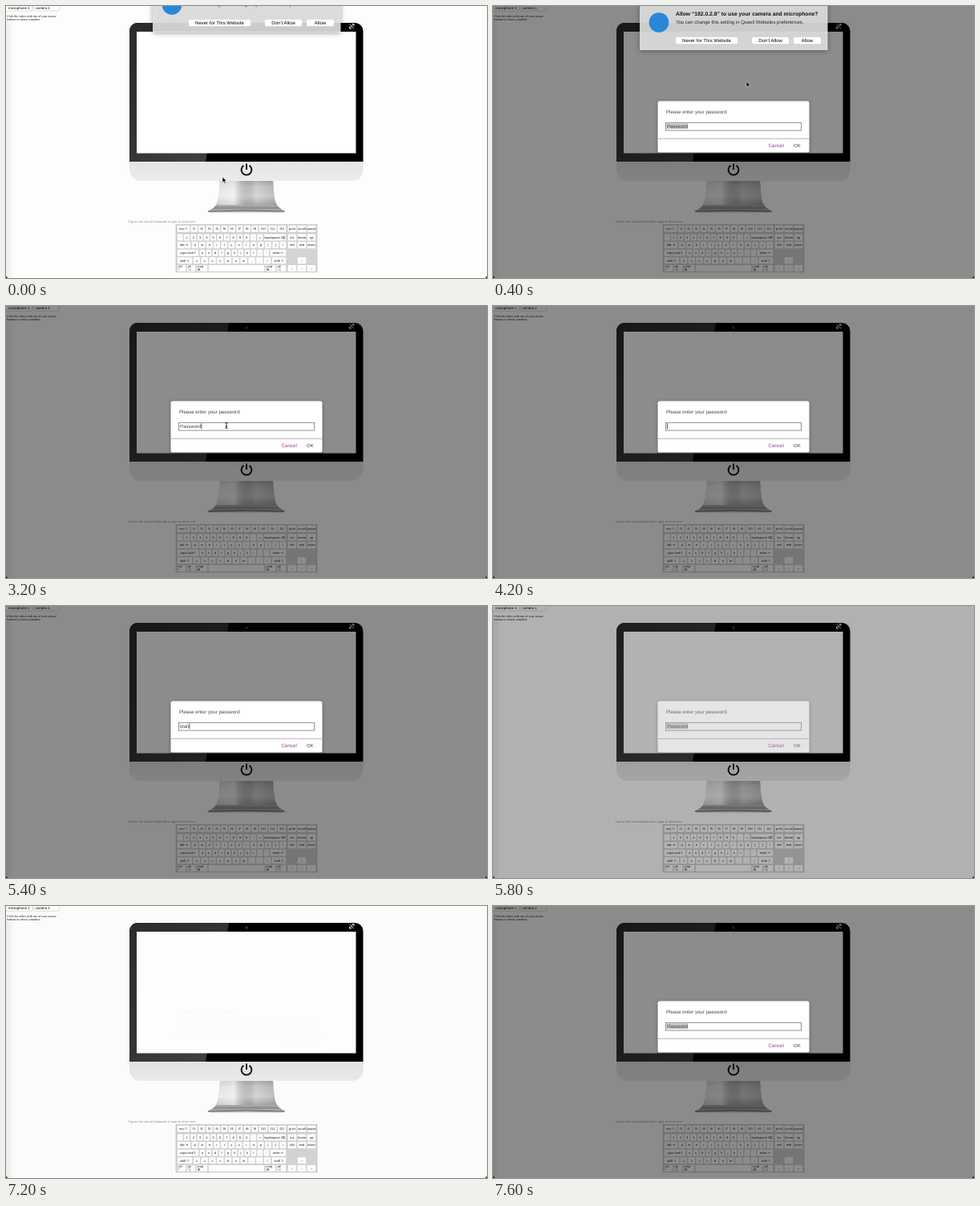
An HTML page for the animation above (8000 ms loop, 600x339 px).

```html
<!DOCTYPE html>
<html lang="en">
<head>
<meta charset="utf-8">
<title>Password prompt</title>
<style>
  html, body { margin: 0; height: 100%; overflow: hidden; background: #fdfdfd; }
  svg { display: block; width: 100vw; height: 100vh; }
  text { font: 6px "Liberation Sans", Arial, "DejaVu Sans", sans-serif; text-rendering: geometricPrecision; white-space: pre; }
  .mid { text-anchor: middle; }
  .key { font-size: 4px; fill: #222; }
  .serif { font: 3.9px "Liberation Serif", serif; }
  #sheet { filter: drop-shadow(0 1px 3px rgba(0, 0, 0, .4)); }
  #sheet .button { fill: #fff; filter: drop-shadow(0 .4px .4px rgba(0, 0, 0, .3)); }
  #dialog .card { filter: drop-shadow(0 1px 2px rgba(0, 0, 0, .35)); }
</style>
</head>
<body>
<svg viewBox="0 0 600 339">
  <defs>
    <linearGradient id="edge"><stop stop-color="#000" stop-opacity=".07"/><stop offset="1" stop-opacity="0"/></linearGradient>
    <linearGradient id="gloss" x2=".8" y2="1"><stop stop-color="#2b2b2b"/><stop offset=".5" stop-color="#333"/><stop offset="1" stop-color="#404040"/></linearGradient>
    <linearGradient id="chin" x2="0" y2="1"><stop stop-color="#e4e4e4"/><stop offset="1" stop-color="#ececec"/></linearGradient>
    <linearGradient id="neck" x2="0" y2="1">
      <stop stop-color="#b4b4b4"/><stop offset=".2" stop-color="#d4d4d4"/><stop offset=".5" stop-color="#e2e2e2"/>
      <stop offset=".75" stop-color="#b8b8b8"/><stop offset=".86" stop-color="#8c8c8c"/><stop offset="1" stop-color="#d8d8d8"/>
    </linearGradient>
    <linearGradient id="sheen">
      <stop stop-color="#fff" stop-opacity=".3"/><stop offset=".3" stop-color="#fff" stop-opacity=".55"/>
      <stop offset=".65" stop-color="#000" stop-opacity=".04"/><stop offset="1" stop-color="#000" stop-opacity=".16"/>
    </linearGradient>
    <clipPath id="case"><path d="M164 21H435.5a10 10 0 0 1 10 10V204a14 14 0 0 1-14 14H168a14 14 0 0 1-14-14V31a10 10 0 0 1 10-10Z"/></clipPath>
  </defs>

  <rect width="600" height="339" fill="#fdfdfd"/>
  <rect y="19" width="10" height="320" fill="url(#edge)"/>
  <g fill="#fff" stroke="#bbb" stroke-width=".5">
    <rect x="-3" y="-2" width="36" height="8.3" rx="2"/>
    <rect x="34" y="-2" width="32.5" height="8.3" rx="2"/>
  </g>
  <text x="3" y="4.2" style="font-size:4.4px">microphone 1</text>
  <text x="36.5" y="4.2" style="font-size:4.4px">camera 1</text>
  <text class="serif" x="1" y="13.6">Click the video with one of your mouse</text>
  <text class="serif" x="1" y="17.9">buttons to return a number.</text>

  <path id="stand" d="M267 217H333C334 233 335 244 338 248Q341 253 348 255.500Q347 257.500 340 257.500H260Q253 257.500 251.500 255.500Q259 253 262 248C265 243 266 233 267 217Z" fill="url(#neck)"/>
  <use href="#stand" style="fill:none"/>
  <path d="M267 217H333C334 233 335 244 338 248H262C265 243 266 233 267 217Z" fill="url(#sheen)"/>
  <path d="M252 256Q300 254 347.500 256" fill="none" stroke="#555" stroke-width="1"/>
  <g clip-path="url(#case)">
    <rect x="154" y="21" width="292" height="173" fill="#000"/>
    <path d="M154 21H278L249 194H154Z" fill="url(#gloss)"/>
    <rect x="154" y="194" width="292" height="24" fill="url(#chin)"/>
  </g>
  <rect x="163" y="32" width="273.500" height="151.500" fill="#fff"/>
  <circle cx="300" cy="27" r="1.300" fill="#222" stroke="#555" stroke-width=".6"/>
  <path d="M428.500 28L434 22.500M431.500 22.500H434V25M428.500 25.500V28H431M428.500 22.800L434 28" fill="none" stroke="#eee" stroke-width=".9"/>
  <path d="M296.500 198.800A6.400 6.400 0 1 0 303.500 198.800M300 196.500V204" fill="none" stroke="#111" stroke-width="2"/>

  <text x="152.500" y="269.700" fill="#888" style="font-size:3.8px;letter-spacing:.08px">Tap on the virtual keyboard or type to enter text</text>
  <rect x="212" y="272.300" width="176" height="59.500" fill="#d4d4d4" stroke="#bbb" stroke-width=".6"/>
  <g id="keys"></g>
  <path d="M0 336.500V339H2.500ZM600 336.500V339H597.500Z" fill="#333"/>

  <rect id="shade" width="600" height="339"/>
  <g id="dialog">
    <rect class="card" x="205.500" y="118.500" width="189" height="64" rx="2.500" fill="#fff"/>
    <text x="216" y="133.900" fill="#444" style="font-size:6.1px">Please enter your password</text>
    <rect x="215.400" y="145.300" width="169.200" height="9.800" fill="#fff" stroke="#777" stroke-width=".8"/>
    <rect id="selection" x="216.500" y="146.300" width="26.700" height="7" fill="#c4c4c4"/>
    <text id="entry" x="217" y="151.700" fill="#444"></text>
    <rect id="caret" y="146.300" width=".7" height="7" fill="#111"/>
    <path d="M205.500 165.500H394.500" stroke="#aaa" stroke-width=".8"/>
    <text x="343.500" y="176.400" fill="#963a94" style="font-size:6.25px">Cancel</text>
    <text x="375" y="176.400" fill="#66206c">OK</text>
  </g>

  <g id="sheet">
    <rect x="183" y="-30" width="234.500" height="85" fill="#e2e2e2" fill-opacity=".9"/>
    <circle cx="207" cy="20.500" r="12.300" fill="#2a86d8"/>
    <text x="228" y="12.400" fill="#111" style="font-size:6.78px;font-weight:bold">Allow “192.0.2.8” to use your camera and microphone?</text>
    <text x="228" y="22" fill="#222">You can change this setting in Quavil Websites preferences.</text>
    <g id="buttons"></g>
  </g>

  <path id="arrow" d="M0 0V7L1.600 5.500L2.800 8.200L3.900 7.700L2.800 5.100H5Z" stroke="#fff" stroke-width=".5"/>
  <path id="beam" d="M-1.600-3.500Q0-3.500 0-2.500Q0-3.500 1.600-3.500M0-2.500V2.500M-1.600 3.500Q0 3.500 0 2.500Q0 3.500 1.600 3.500M-.9.800H.9" fill="none" stroke="#111" stroke-width=".9"/>
</svg>

<script>
const $ = id => document.getElementById(id);
const LOOP = 8000, STEP = 200;

function label(x, y, text, cls = 'mid') {
  return `<text class="${cls}" x="${x}" y="${y}">${text}</text>`;
}

function box(x, y, w, h, attrs) {
  return `<rect x="${x}" y="${y}" width="${w}" height="${h}" ${attrs}/>`;
}

// Equal keys between two edges; "a|b" stacks two labels at the left.
function keyRun(y, left, right, names) {
  const list = names.split(' ');
  const w = (right - left) / list.length;
  return list.map((name, i) => {
    const x = left + i * w;
    const [top, bottom] = name === '|' ? ['|'] : name.replace('_', ' ').split('|');
    const face = box(x + .3, y, w - .6, 8.8, 'rx=".8" fill="#fefefe" stroke="#b8b8b8" stroke-width=".4"');
    if (bottom) return face + label(x + 1.5, y + 3.6, top, 'key') + label(x + 1.5, y + 7.9, bottom, 'key');
    return face + label(x + w / 2, y + 5.8, top, 'key mid');
  }).join('');
}

const rows = [
  [273.2, [213, 230, 'esc_⎋'], [230, 315, 'f1 f2 f3 f4 f5 f6 f7 f8 f9'], [315, 350, 'f10 f11 f12'], [351, 387, 'print scroll pause']],
  [284, [213, 321, '` 1 2 3 4 5 6 7 8 9 0 - ='], [321, 350, 'backspace_⌫'], [351, 387, 'ins home up']],
  [293.6, [213, 231, 'tab_⇥'], [231, 350, 'q w e r t y u i o p [ ] \\'], [351, 387, 'del end down']],
  [303.2, [213, 241, 'caps_lock⇪'], [241, 329, 'a s d f g h j k l ; \''], [329, 350, 'enter_↵']],
  [312.8, [213, 233, 'shift_⇧'], [233, 331, 'z x c v b n m , . /'], [331, 350, 'shift_⇧'], [363, 375, '↑']],
  [322.4, [213, 237, 'ctrl|^ alt|⌥'], [237, 252, 'cmd|⌘'], [252, 323, '_'], [323, 337, 'cmd|⌘'], [337, 350, 'alt|⌥'], [351, 387, '← ↓ →']]
];
$('keys').innerHTML = rows.map(([y, ...runs]) => runs.map(run => keyRun(y, ...run)).join('')).join('');

$('buttons').innerHTML = [[228, 77, 'Never for This Website'], [323, 46, 'Don’t Allow'], [375, 34, 'Allow']]
  .map(([x, w, text]) => box(x, 38.5, w, 9, 'rx="1.8" class="button"') + label(x + w / 2, 45.1, text)).join('');

// Entries are [start time, value...]; each holds until the next.
const SELECTED = '*';
const entries = [
  [0, SELECTED], [3200, 'Password'], [4000, SELECTED], [4200, ''],
  [5000, 'b'], [5200, 'bla'], [5400, 'blah'], [5800, SELECTED],
  [6600, 'b'], [6800, 'bla'], [7000, 'blah'], [7400, SELECTED]
];
const fades = [[0, 0], [200, .67], [400, 1], [5600, .02], [5800, .67], [6000, 1], [7200, .02], [7400, .67], [7600, 1]];
const slides = [[0, -22], [200, -2], [400, 0], [2400, -30], [2600, -70]];
const pointer = [
  [0, 'arrow', 270, 213], [200, 'arrow', 292, 152], [400, 'arrow', 316, 94], [600, 'arrow', 313, 105],
  [800, 'arrow', 308, 118], [1000, 'arrow', 302, 128], [1200, 'arrow', 299, 132], [1400, 'arrow', 325, 149],
  [1800, 'arrow', 350, 102], [2000, 'arrow', 386, 52], [2200, 'arrow', 390, 43], [2600, 'arrow', 345, 95],
  [2800, 'arrow', 290, 141], [3000, 'beam', 281, 148], [3200, 'beam', 275, 149], [4000, 'beam', 278, 149], [4200, 'none', 0, 0]
];

function at(track, t) {
  return track.filter(([start]) => start <= t).pop().slice(1);
}

function draw(t) {
  const [entry] = at(entries, t);
  const [fade] = at(fades, t);
  const [slide] = at(slides, t);
  const [shape, x, y] = at(pointer, t);
  const selected = entry === SELECTED;

  $('shade').setAttribute('opacity', .45 * fade);
  $('dialog').setAttribute('opacity', fade);
  $('sheet').setAttribute('transform', `translate(0 ${slide})`);
  $('entry').textContent = selected ? 'Password' : entry;
  $('selection').setAttribute('opacity', selected ? 1 : 0);
  $('caret').setAttribute('opacity', selected ? 0 : 1);
  $('caret').setAttribute('x', 217.2 + (entry ? $('entry').getComputedTextLength() : 0));
  for (const id of ['arrow', 'beam']) {
    $(id).setAttribute('visibility', id === shape ? 'visible' : 'hidden');
    $(id).setAttribute('transform', `translate(${x} ${y})`);
  }
}

const begin = performance.now();
function tick() {
  const t = (performance.now() - begin) % LOOP;
  draw(Math.floor(t / STEP) * STEP);
  requestAnimationFrame(tick);
}
tick();
</script>
</body>
</html>
```
